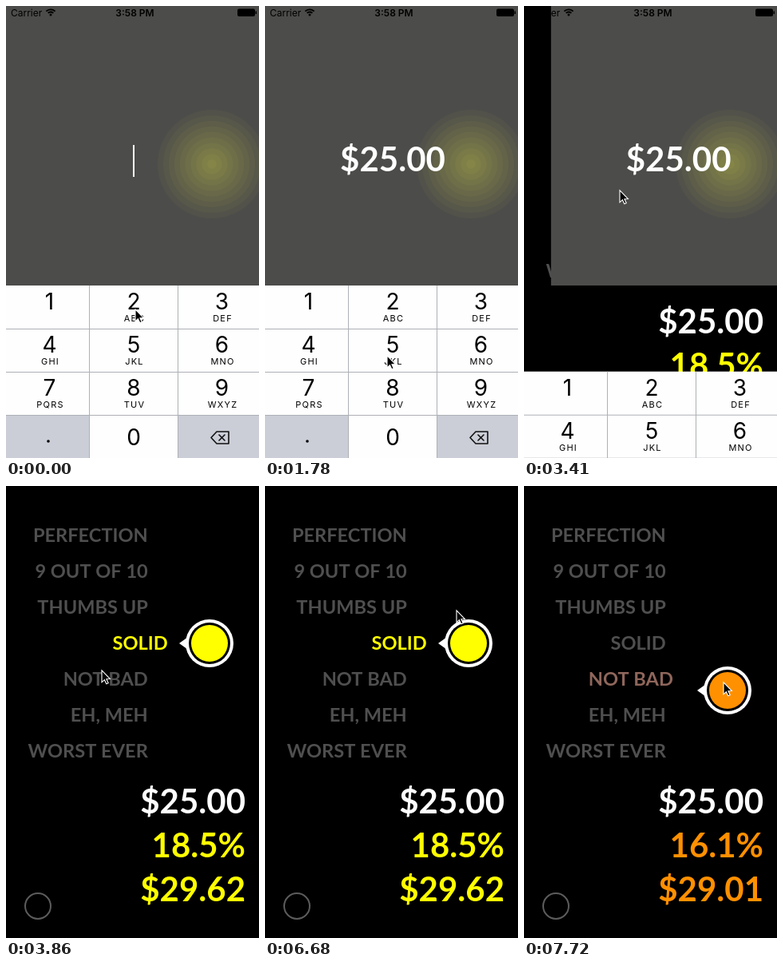
Animation, 317 px wide and 566 px high, one loop 8 s. Source, as an HTML page with a canvas:

```html
<!DOCTYPE html>
<html lang="en">
<head>
<meta charset="utf-8">
<title>Tip calculator</title>
<style>
  html, body { margin: 0; width: 100%; height: 100%; overflow: hidden; background: #000; }
  canvas { display: block; width: 317px; height: 566px; }
</style>
</head>
<body>
<canvas id="stage"></canvas>
<script>
const W = 317, H = 566, LOOP = 8000, TICK = 148.5;
const canvas = document.getElementById('stage');
const ctx = canvas.getContext('2d');
const ratio = window.devicePixelRatio || 1;
canvas.width = W * ratio;
canvas.height = H * ratio;

const UI = 'Inter, "Open Sans", sans-serif';
const DISPLAY = 'Lato, "Open Sans", sans-serif';
const AMOUNT = `700 42px ${DISPLAY}`;
const PANEL_H = 350, KEY_TOP = 350, KEY_H = 54, PAD_H = 216;
const LABELS = ['PERFECTION', '9 OUT OF 10', 'THUMBS UP', 'SOLID', 'NOT BAD', 'EH, MEH', 'WORST EVER'];
const LETTERS = ['', 'ABC', 'DEF', 'GHI', 'JKL', 'MNO', 'PQRS', 'TUV', 'WXYZ'];

// Where the pointer travels between its stops, in ticks.
const MOVES = [
  { from: 8, to: 12, x: 153, y: 437 },
  { from: 14, to: 15, x: 162, y: 453 },
  { from: 15, to: 18, x: 134, y: 264 },
  { from: 19, to: 20, x: 120, y: 230 },
  { from: 36, to: 38, x: 83, y: 457 },
  { from: 39, to: 41, x: 50, y: 524 },
  { from: 42, to: 45, x: 240, y: 155 },
  { from: 45, to: 47, x: 250, y: 186 }
];

const clamp = v => Math.max(0, Math.min(1, v));
const lerp = (a, b, k) => a + (b - a) * k;
const span = (n, from, to) => clamp((n - from) / (to - from));
const smooth = k => k * k * (3 - 2 * k);
const blend = (a, b, k) => `rgb(${a.map((v, i) => Math.round(lerp(v, b[i], k))).join(',')})`;

function hsv(h, s, v) {
  const l = v * (1 - s / 2);
  const sat = (v - l) / Math.min(l, 1 - l);
  return `hsl(${h} ${sat * 100}% ${l * 100}%)`;
}

const knobY = n => lerp(197, 256, smooth(span(n, 47, 52)));
const panelX = n => W * smooth(span(n, 22.24, 26));
const padY = n => PAD_H * (1 - (1 - span(n, 22, 26)) ** 2.4);

function pointerAt(n) {
  let x = 162, y = 379;
  for (const m of MOVES) {
    const k = smooth(span(n, m.from, m.to));
    x = lerp(x, m.x, k);
    y = lerp(y, m.y, k);
  }
  return [x, y + knobY(n) - knobY(0)];
}

function text(str, x, y, font, color, align = 'left', spacing = 0) {
  ctx.font = font;
  ctx.fillStyle = color;
  ctx.textAlign = align;
  ctx.letterSpacing = spacing + 'px';
  ctx.fillText(str, x, y);
}

function rect(x, y, w, h, color) {
  ctx.fillStyle = color;
  ctx.fillRect(x, y, w, h);
}

function disc(x, y, r, color) {
  ctx.fillStyle = color;
  ctx.beginPath();
  ctx.arc(x, y, r, 0, Math.PI * 2);
  ctx.fill();
}

function path(points, close = true) {
  ctx.beginPath();
  points.forEach(([x, y]) => ctx.lineTo(x, y));
  if (close) ctx.closePath();
}

function drawTips(n) {
  rect(0, 0, W, H, '#000');
  const y = knobY(n);
  const drag = (y - 197) / 59;
  const hue = lerp(60, 34, drag);
  const accent = hsv(hue, 1, 1);
  const rate = 18.495 - 2.445 * drag;

  LABELS.forEach((label, i) => {
    const k = clamp(1 - (Math.abs(y - 196 - 45 * (i - 3)) - 1) / 22);
    text(label, 177.8 + 25 * k, 70 + 45 * i, `700 23.6px ${DISPLAY}`,
      hsv(hue * k, k, lerp(0.31, 1, k)), 'right');
  });

  ctx.fillStyle = '#fff';
  path([[217, y], [231, y - 10], [231, y + 10]]);
  ctx.fill();
  disc(255, y, 30, '#fff');
  disc(255, y, 26, '#000');
  disc(255, y, 23, accent);

  const total = Math.floor(25 * (100 + rate) + 1e-6) / 100;
  text('$25.00', 300, 409.5, AMOUNT, '#fff', 'right');
  text(rate.toFixed(1) + '%', 300, 464.5, AMOUNT, accent, 'right');
  text('$' + total.toFixed(2), 300, 519.5, AMOUNT, accent, 'right');

  ctx.strokeStyle = '#5c5c5c';
  ctx.lineWidth = 2;
  ctx.beginPath();
  ctx.arc(40, 526, 16, 0, Math.PI * 2);
  ctx.stroke();
}

function drawPanel(n) {
  const x = panelX(n);
  if (x >= W) return;
  const base = [76, 76, 74], core = [133, 133, 72], bands = 10;
  ctx.save();
  ctx.beginPath();
  ctx.rect(x, 0, W, PANEL_H);
  ctx.clip();
  rect(x, 0, W, PANEL_H, blend(base, core, 0));

  // The backdrop glow stays put while the panel slides over it.
  for (let i = 0; i < bands; i++)
    disc(258, 198, 68 - 6.9 * i, blend(base, core, (i + 1) / bands));

  const amount = n < 8 ? '' : n < 11 ? '$2.00' : '$25.00';
  if (amount) text(amount, 160 + x, 207, AMOUNT, '#fff', 'center');
  else rect(159, 174, 2, 40, `rgba(255,255,255,${clamp(0.5 + 0.8 * Math.cos(n * 0.93))})`);
  ctx.restore();
}

function drawStatus() {
  text('Carrier', 6, 12.5, `400 12px ${UI}`, '#000');
  text('3:58 PM', 161.5, 12.5, `600 12px ${UI}`, '#000', 'center');
  ctx.strokeStyle = '#000';
  ctx.lineWidth = 1.8;
  for (const r of [4.5, 7.7]) {
    ctx.beginPath();
    ctx.arc(56, 12, r, -Math.PI * 0.76, -Math.PI * 0.24);
    ctx.stroke();
  }
  disc(56, 11, 1.5, '#000');
  ctx.beginPath();
  ctx.roundRect(290, 3.5, 22, 9.5, 2);
  ctx.fill();
  rect(312.5, 6.5, 1.5, 3.5, '#000');
}

function drawDelete() {
  ctx.strokeStyle = '#111';
  ctx.lineWidth = 1.6;
  ctx.lineJoin = ctx.lineCap = 'round';
  path([[257, 540.5], [264, 533], [279, 533], [279, 548], [264, 548]]);
  ctx.stroke();
  for (const d of [-3.5, 3.5]) {
    path([[270.5 - d, 537], [270.5 + d, 544]], false);
    ctx.stroke();
  }
}

function drawKeypad(n) {
  const dy = padY(n);
  if (dy >= PAD_H) return;
  const digit = `400 28px ${UI}`;
  ctx.save();
  ctx.translate(0, dy);
  rect(0, KEY_TOP, W, PAD_H, '#fefefe');
  rect(0, 512, 104, KEY_H, '#cbced6');
  rect(216, 512, 101, KEY_H, '#cbced6');
  if (n === 7) rect(105, KEY_TOP, 110, KEY_H, '#c9ccd3');
  if (n === 10) rect(105, KEY_TOP + KEY_H, 110, KEY_H, '#c9ccd3');

  for (let row = 1; row < 4; row++) rect(0, KEY_TOP + KEY_H * row, W, 1, '#adb0b5');
  for (const x of [104, 215]) rect(x, KEY_TOP, 1, PAD_H, '#adb0b5');

  LETTERS.forEach((letters, i) => {
    const x = 54.5 + 108 * (i % 3) - (i % 3 === 1 ? 2.5 : 0);
    const y = KEY_TOP + KEY_H * Math.floor(i / 3);
    text(String(i + 1), x, y + 30, digit, '#000', 'center');
    text(letters, x + 1, y + 45, `400 11px ${UI}`, '#000', 'center', 1.2);
  });
  text('0', 160, 550, digit, '#000', 'center');
  disc(53, 545, 1.8, '#000');
  drawDelete();
  ctx.restore();
}

function drawPointer(n) {
  const [x, y] = pointerAt(n);
  ctx.save();
  ctx.translate(x, y + 0.8);
  path([[0, 0], [0, 15], [3.4, 11.9], [5.8, 17], [8.2, 16], [5.9, 11], [10.4, 10.8]]);
  ctx.fillStyle = '#000';
  ctx.fill();
  ctx.strokeStyle = '#fff';
  ctx.lineWidth = 1.1;
  ctx.lineJoin = 'miter';
  ctx.stroke();
  ctx.restore();
}

const start = performance.now();
function frame() {
  const t = (performance.now() - start) % LOOP;
  const n = Math.floor((t + 6) / TICK); // motion advances in even ticks
  ctx.setTransform(ratio, 0, 0, ratio, 0, 0);
  drawTips(n);
  drawPanel(n);
  if (n < 26) drawStatus();
  drawKeypad(n);
  drawPointer(n);
  requestAnimationFrame(frame);
}
frame();
</script>
</body>
</html>
```
